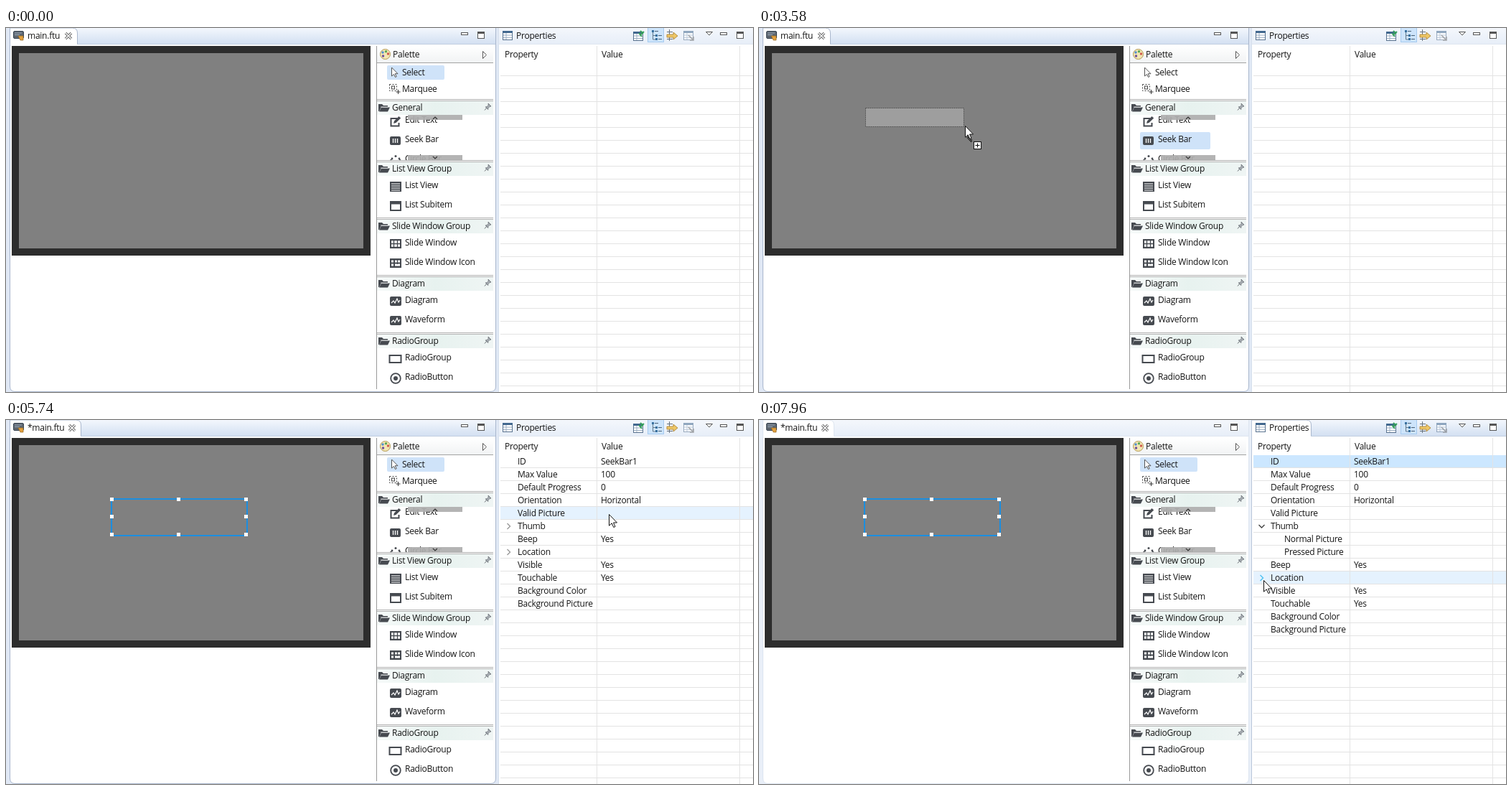
Recreate the animation shown at these times as an HTML page. Size 1041x507 px, loop 8000 ms.

```html
<!DOCTYPE html>
<html lang="en">
<head>
<meta charset="utf-8">
<title>Seek bar properties</title>
<style>
html, body { margin: 0; width: 100%; height: 100%; overflow: hidden; background: #fff; }
svg { display: block; width: 1041px; height: 507px; }
text { font: 12px "Open Sans", "Noto Sans", sans-serif; letter-spacing: -.25px; fill: #141414; white-space: pre; }
</style>
</head>
<body>
<svg id="stage" viewBox="0 0 1041 507">
  <defs>
    <linearGradient id="active" x2="0" y2="1"><stop stop-color="#f3f7fd"/><stop offset="1" stop-color="#d3e0f2"/></linearGradient>
    <linearGradient id="idle" x2="0" y2="1"><stop stop-color="#f4f7fc"/><stop offset="1" stop-color="#e7eef8"/></linearGradient>
    <linearGradient id="section"><stop stop-color="#f6faf9"/><stop offset=".5" stop-color="#e7f2ef"/><stop offset="1" stop-color="#eff5f4"/></linearGradient>
    <linearGradient id="paletteBar" x2="0" y2="1"><stop stop-color="#fff"/><stop offset="1" stop-color="#f1f3f4"/></linearGradient>
    <pattern id="checker" width="2" height="2" patternUnits="userSpaceOnUse"><path d="M0 0h1v1h-1zM1 1h1v1h-1z"/></pattern>
    <clipPath id="generalClip"><rect x="517" y="121" width="162" height="63"/></clipPath>
  </defs>
  <g id="back"></g>
  <g id="fixed"></g>
  <g id="front"></g>
</svg>
<script>
const LOOP = 8000, STEP = 60, OFFSET = 40;
const INK = '#464a50', LINE = '#e3e3e3', PICKED = '#cfe3f9', HOVER = '#ffe4b0';
const layer = id => document.getElementById(id);

const rect = (x, y, w, h, fill, more = '') =>
  `<rect x="${x}" y="${y}" width="${w}" height="${h}" fill="${fill}" ${more}/>`;
const path = (d, fill = 'none', stroke = 'none', w = 1) =>
  `<path d="${d}" fill="${fill}" stroke="${stroke}" stroke-width="${w}"/>`;
const text = (x, y, s) => `<text x="${x}" y="${y}">${s}</text>`;
const circle = (x, y, r, fill, more = '') => `<circle cx="${x}" cy="${y}" r="${r}" fill="${fill}" ${more}/>`;
const at = (x, y, body) => `<g transform="translate(${x} ${y})">${body}</g>`;

// Icons, drawn from their top left corner
const frame = rect(1, 1, 14, 12, 'none', `stroke="${INK}" stroke-width="2"`);
const graph = rect(0, 0, 16, 13, INK, 'rx="2"') + path('M2 9l3-3 2 3 3-6 2 5 2-3', 'none', '#fff', 1.2);
const icons = {
  edit: path('M10 3H1.5v10.5h11V9', 'none', INK, 2) + path('M5 10l1-3.5L12.5 0l2.7 2.6L8.500 9z', INK),
  seek: rect(0, 0, 15, 12, INK, 'rx="2"') + path('M4.500 3v6M7.500 3v6M10.500 3v6', 'none', '#fff', 1.3),
  dots: circle(3, 5, 1.4, INK) + circle(8, 1.5, 1.5, INK) + circle(13, 5, 1.4, INK) + circle(1.5, 7, 1.2, INK) + circle(14, 7, 1.2, INK),
  list: rect(0, 0, 16, 14, INK) + path('M2 3h12M2 6h12M2 9h12M2 12h12', 'none', '#fff', 1.2),
  window: frame + path('M1 3h14', 'none', INK, 3),
  grid: rect(0, 0, 16, 13, INK) + path('M2 4h12M2 9h12', 'none', '#fff', 3.4) + path('M5.500 2v9M10.500 2v9', 'none', INK, 1.3),
  slideIcon: rect(0, 0, 16, 13, INK) + path('M2 4h3M7 4h7M2 9h3M7 9h7', 'none', '#fff', 3) + path('M10.500 2v6', 'none', INK, 1.3),
  graph,
  box: rect(-.5, 1, 16, 10, 'none', `stroke="${INK}" stroke-width="2"`),
  radio: circle(8, 7, 6.8, 'none', `stroke="${INK}" stroke-width="1.8"`) + circle(8, 7, 3, INK),
  folder: path('M0 11V1h5l2 2h6v2H4l-3 6z', INK) + path('M1 11.500l3-6h12l-3 6z', INK) + path('M3.300 5h10', 'none', '#fff', .8),
  pin: path('M5 0l4 4-2 .5-2 2-.3 2-3.500-3.600 2-.3 2-2z', '#a7adb3', '#676d73', .8) + path('M3 6l-3 3.500', 'none', '#676d73'),
  min: rect(.5, .5, 9, 3, '#fff', 'stroke="#555"'),
  max: rect(.5, .5, 9, 9, '#fff', 'stroke="#555"') + path('M0 2h10', 'none', '#555', 2),
  table: rect(.5, .5, 13, 12, '#fff', 'stroke="#59728f"') + rect(0, 0, 14, 3, '#42688f') + path('M1 6h12M1 9.500h12M5 3v9', 'none', '#9eb0c4'),
};

// label, icon, icon top, baseline, highlight right edge
const items = [
  ['Edit Text', 'edit', 123, 132, 631], ['Seek Bar', 'seek', 151, 159, 629], ['Circle Bar', 'dots', 177, 186, 634],
  ['List View', 'list', 214, 223, 631], ['List Subitem', 'window', 241, 250, 650],
  ['Slide Window', 'grid', 294, 303, 657], ['Slide Window Icon', 'slideIcon', 321, 330, 676],
  ['Diagram', 'graph', 374, 383, 629], ['Waveform', 'graph', 401, 410, 638],
  ['RadioGroup', 'box', 455, 463, 646], ['RadioButton', 'radio', 481, 490, 650],
];
const sections = [['General', 100], ['List View Group', 185], ['Slide Window Group', 265], ['Diagram', 345], ['RadioGroup', 425]];

function drawPalette() {
  let s = path('M516.500 25V503', 'none', '#9a9a9a') + rect(517, 25, 162, 23, 'url(#paletteBar)') +
    path('M517 48.500H679', 'none', '#a3a3a3') + text(539, 41, 'Palette') +
    circle(528.5, 36.5, 7, '#f3e6b3', 'stroke="#b49a55"') + circle(525, 34, 1.7, '#4f8fd2') +
    circle(529.5, 32.7, 1.7, '#5da854') + circle(532.5, 36, 1.7, '#d0574b') + circle(525.5, 39, 1.7, '#6c4b9c') +
    path('M664.500 32.500v10l5-5z', '#fff', '#555') +
    path('M537.500 55v12l3-2.500 2 4 1.700-.8-2-4h3.800z', '#fff', '#555') + text(552, 66, 'Select') +
    rect(534.5, 78.5, 10, 9, 'none', 'stroke="#444" stroke-dasharray="2 2"') + rect(537.5, 81, 4, 4, '#fff', 'stroke="#444"') +
    path('M546.500 86v6M543.500 89h6', 'none', '#333') + text(552, 89, 'Marquee');
  for (const [name, y] of sections) {
    s += rect(517, y + 1, 162, 20, 'url(#section)') + path(`M517 ${y - .5}H679M517 ${y + 1.5}H679`, 'none', '#b1b1b1') +
      at(519, y + 5, icons.folder) + text(538, y + 15, name) + at(667, y + 5, icons.pin);
  }
  const entries = items.map(([name, icon, top, base]) => at(535, top, icons[icon]) + text(556, base, name));
  s += `<g clip-path="url(#generalClip)">${entries.slice(0, 3).join('')}` +
    rect(560, 121, 76, 7, '#afafaf', 'opacity=".93"') + rect(560, 177, 76, 7, '#afafaf', 'opacity=".93"') +
    path('M595 127l3-3 3 3M595 179l3 3 3-3', 'none', '#333', 1.2) + '</g>';
  return s + entries.slice(3).join('');
}

function drawFixed() {
  let s = rect(8, 25, 500, 292, '#2d2d2d') + rect(18, 35, 480, 272, '#808080') + drawPalette();
  s += rect(10.5, 4.5, 14, 10, '#5e6670', 'rx="1.5" stroke="#394654"') + path('M12 7h10M12 9.500h7', 'none', '#98a8b9') +
    path('M17 11h7v6h-4z', '#e3a13e', '#946520', .7);
  s += at(634, 6, icons.min) + at(657, 5, icons.max) + at(995, 6, icons.min) + at(1018, 5, icons.max);
  s += at(692, 4, icons.table) + text(711, 15, 'Properties');
  // Properties toolbar
  s += at(874, 5, icons.table) + path('M884 10l5-5M882 7l4 5M884 4l4 4', 'none', '#36a05c', 2);
  s += rect(894.5, -.5, 22, 20, '#cde4fb', 'stroke="#a6cbef"') + path('M901.500 5v11h4M901.500 10.500h4', 'none', '#64788c') +
    [[900, 3], [905, 9], [905, 14]].map(([x, y]) => rect(x, y, 3, 3, '#39719f') + path(`M${x + 4} ${y + 1.5}h5`, 'none', '#4c6276')).join('');
  s += path('M921 5.500h8M921 15.500h8M924.500 2v16', 'none', '#66727e') + path('M921 9h9V6l6 5-6 5v-3h-9z', '#eec766', '#a87d2b', .8);
  s += `<g opacity=".55">${at(944, 4, icons.table)}${path('M951 10l7 7M958 12v5h-5', 'none', '#666', 1.6)}</g>`;
  s += path('M975.500 5.500h9l-4.500 4.500z', '#fff', '#555');
  let grid = 'M823.500 25V507M1022.500 25V507';
  for (let y = 66.5; y < 507; y += 18) grid += `M689 ${y}H1041`;
  return s + path(grid, 'none', LINE) + text(695, 41, 'Property') + text(830, 41, 'Value');
}

// Window backgrounds: the focused part has a stronger header and a tab outline
function drawPanels(editorFocus, tabEnd) {
  const edge = editorFocus ? '#a9b7cd' : '#dde5f0';
  const tab = (x, end, stroke) => path(`M${x} 22.500V0H${end - 7}q7 0 7 7v15.500`, '#fff', stroke);
  let s = rect(0, 0, 1041, 507, editorFocus ? '#e0e8f5' : '#e9eff8') +
    path('M5.500-1V499q0 7.500 7.500 7.500H675q7.500 0 7.500-7.500V-1z', '#fff', edge) +
    rect(6, 0, 676, 22, `url(#${editorFocus ? 'active' : 'idle'})`) + path('M6 22.500H682', 'none', editorFocus ? '#c1cee0' : '#dfe6f0') +
    tab(5.5, tabEnd + .5, edge) + rect(6, 22, tabEnd - 6, 1, '#fff') +
    rect(687, 0, 354, 507, '#fff') + rect(687, 0, 354, 22, `url(#${editorFocus ? 'idle' : 'active'})`);
  if (!editorFocus) s += tab(686.5, 769.5, '#a9b7cd') + path('M769 22.500H1041', 'none', '#c1cee0') + path('M686.500 0V507', 'none', '#b9c6d9');
  else s += path('M687 22.500H1041', 'none', '#dfe6f0') + path('M686.500 0V507', 'none', '#d6dfec');
  return s;
}

const track = [
  [100, 1002, 76], [460, 1002, 76], [520, 951, 94], [640, 902, 121], [700, 823, 157], [760, 759, 174],
  [820, 717, 182], [880, 687, 190], [940, 667, 203], [1060, 638, 220], [1240, 614, 242], [1300, 613, 244],
  [1540, 612, 293], [1660, 609, 292], [1840, 595, 235], [2020, 582, 172], [2140, 577, 163], [2440, 577, 163],
  [2620, 480, 150], [2860, 245, 123], [3040, 165, 113], [3160, 148, 111], [3340, 150, 112], [3460, 220, 122],
  [3580, 287, 136], [3820, 322, 150], [4120, 334, 158], [4180, 343, 155], [4600, 343, 155], [4720, 590, 132],
  [4840, 825, 108], [4960, 869, 85], [5080, 875, 62], [5200, 866, 72], [5440, 845, 96], [5560, 845, 105],
  [5740, 840, 131], [5920, 755, 150], [6100, 682, 157], [6280, 700, 149], [6460, 702, 148], [7180, 702, 148],
  [7480, 704, 190], [7720, 705, 230], [7960, 703, 223],
];
function pointer(t) {
  const i = track.findIndex(p => p[0] > t);
  if (i < 0) return track[track.length - 1].slice(1);
  const a = track[i - 1], b = track[i], k = (t - a[0]) / (b[0] - a[0]);
  return [1, 2].map(n => Math.round(a[n] + (b[n] - a[n]) * k));
}

const arrow = path('M.5.5V16.200L4.200 12.800 6.800 18.500 9 17.500 6.500 12H11.500z', '#fff', '#111');
const placing = path('M2 16l2-2 3 5 3-1v5H8z', 'url(#checker)') + arrow +
  rect(12.5, 22.5, 10, 10, '#fff', 'stroke="#111"') + path('M17.500 24.500v6M14.500 27.500h6', 'none', '#111');

const rowsFor = open => [
  ['ID', 'SeekBar1'], ['Max Value', '100'], ['Default Progress', '0'], ['Orientation', 'Horizontal'], ['Valid Picture'],
  ['Thumb', '', open ? 'open' : 'shut'], ...(open ? [['Normal Picture', '', 'child'], ['Pressed Picture', '', 'child']] : []),
  ['Beep', 'Yes'], ['Location', '', 'shut'], ['Visible', 'Yes'], ['Touchable', 'Yes'], ['Background Color'], ['Background Picture'],
];

function drawRows(rows, hovered, x) {
  return rows.map(([name, value = '', kind], i) => {
    const y = 62 + 18 * i, lit = i === hovered && x < 712;
    let s = text(kind === 'child' ? 732 : 713, y, name) + text(829, y, value);
    if (kind === 'shut') s += path(`M698.500 ${y - 8}l4 4-4 4`, 'none', lit ? '#4cc2f1' : '#9a9a9a', 1.4);
    if (kind === 'open') s += path(`M696.500 ${y - 6}l4 4 4-4`, 'none', lit ? '#4cc2f1' : '#444', 1.4);
    return s;
  }).join('');
}

function drawSelection() {
  let s = rect(147, 110, 189, 51, 'none', 'stroke="#1b8ee0" stroke-width="2"');
  for (const x of [145, 238, 332]) for (const y of [108, 132, 157])
    if (x !== 238 || y !== 132) s += rect(x, y, 5, 5, '#fff');
  return s;
}

function draw(t) {
  const shown = t >= 100, [x, y] = shown ? pointer(t) : [-50, -50];
  const toolPicked = t >= 2200 && t < 4360, created = t >= 4360, edited = t >= 4420, open = t >= 6880;
  const rows = created ? rowsFor(open) : [];
  const row = Math.floor((y - 49) / 18), hovered = x >= 689 && row >= 0 && row < rows.length ? row : -1;

  let back = drawPanels(!open, edited ? 104 : 99);
  if (!toolPicked) back += rect(531, 52, 80, 20, PICKED, 'rx="2"');
  for (const [name, , , base, right] of items) {
    const top = base - 14, over = x >= 531 && x < right && y >= top && y < top + 24;
    const picked = toolPicked && name === 'Seek Bar';
    if (over || picked) back += rect(531, top, right - 531, 24, picked ? PICKED : HOVER, 'rx="2"');
  }
  if (hovered >= 0) back += rect(689, 49 + 18 * hovered, 352, 17, '#e5f2fe');
  if (t >= 6640) back += rect(689, 49, 352, 17, '#cce7ff');

  const close = edited ? 92 : 87;
  let front = text(30, 15, edited ? '*main.ftu' : 'main.ftu') +
    path(`M${close - 4} 7l8 8m0-8l-8 8`, 'none', '#666', 3.4) + path(`M${close - 4} 7l8 8m0-8l-8 8`, 'none', '#fff', 1.4);
  front += drawRows(rows, hovered, x);
  if (created) front += drawSelection();
  if (t >= 3340 && t < 4180)
    front += rect(148.5, 111.5, Math.max(1, x - 150), Math.max(1, y - 110), '#9e9e9e', 'stroke="#555" stroke-dasharray="2 1"');
  if (shown) front += at(x, y, toolPicked && t < 4180 && x < 508 ? placing : arrow);

  layer('back').innerHTML = back;
  layer('front').innerHTML = front;
}

layer('fixed').innerHTML = drawFixed();
const start = performance.now();
let last = null;
function tick() {
  const now = (performance.now() - start) % LOOP;
  const t = Math.max(0, Math.floor((now - OFFSET) / STEP) * STEP + OFFSET);
  if (t !== last) draw(last = t);
  requestAnimationFrame(tick);
}
tick();
</script>
</body>
</html>
```
